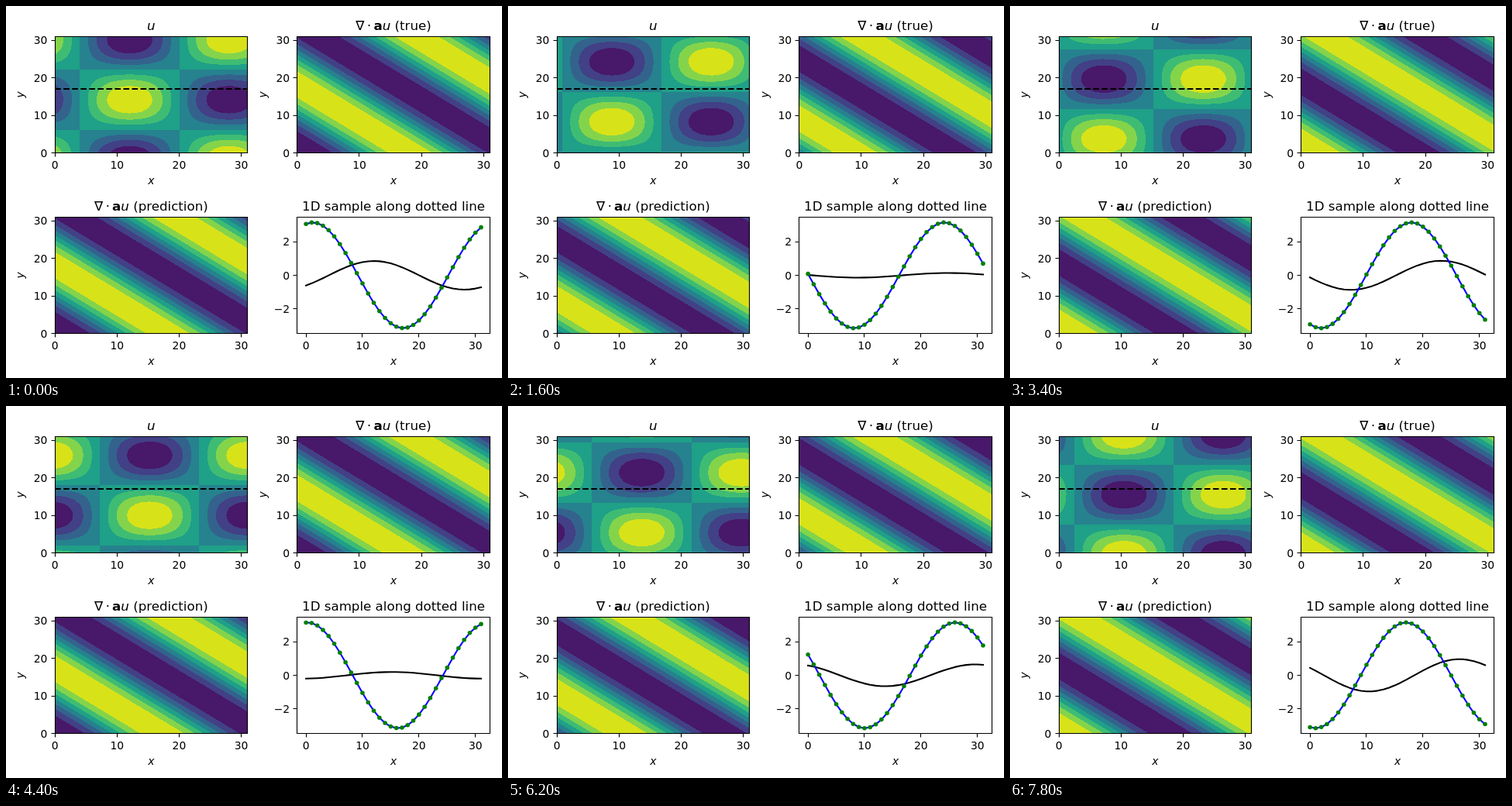
Animation, 640 px wide and 480 px high, one loop 8000 ms. Source, as an HTML page with a canvas:

```html
<!DOCTYPE html>
<html lang="en">
<head>
<meta charset="utf-8">
<title>Advection of a wave</title>
<style>
  html, body { margin: 0; width: 100%; height: 100%; overflow: hidden; background: #fff; }
  canvas, svg { position: absolute; left: 0; top: 0; width: 640px; height: 480px; }
  text { font: 13.89px "DejaVu Sans", sans-serif; fill: #000; }
  .title { font-size: 16.67px; text-anchor: middle; }
  .mid { text-anchor: middle; }
  .end { text-anchor: end; }
  .it { font-style: italic; }
  .b { font-weight: bold; }
</style>
</head>
<body>
<canvas id="plot" width="640" height="480"></canvas>
<svg id="labels" viewBox="0 0 640 480"></svg>
<script>
const STEP_MS = 200, STEPS = 40;
const N = 31, ROW = 17, K = Math.PI / 16;
const W = 248.5, H = 150;
const VIRIDIS = ['48186a', '424086', '33638d', '26828e', '1fa088', '3fbc73', '84d44b', 'd8e219']
  .map(h => [0, 2, 4].map(i => parseInt(h.slice(i, i + 2), 16)));

const ctx = document.getElementById('plot').getContext('2d');
const svg = document.getElementById('labels');

const divTitle = kind =>
  '∇<tspan dx=".2em">⋅</tspan><tspan dx=".2em" class="b">a</tspan>' +
  `<tspan class="it">u</tspan> (${kind})`;

const grid = { x: [0, N], y: [0, N], xt: [0, 10, 20, 30], yt: [0, 10, 20, 30], yLabel: true };
const line = {
  x: [-0.05 * N, 1.05 * N], y: [-1.1 * Math.PI, 1.1 * Math.PI],
  xt: [0, 10, 20, 30], yt: [-2, 0, 2], yLabel: false
};
const wave = { left: 63.1, top: 39.5, title: '<tspan class="it">u</tspan>', ...grid };
const exact = { left: 375.8, top: 39.5, title: divTitle('true'), ...grid };
const guess = { left: 63.1, top: 272.5, title: divTitle('prediction'), ...grid };
const sample = { left: 375.8, top: 272.5, title: '1D sample along dotted line', ...line };
const panels = [wave, exact, guess, sample];

const px = (p, x) => p.left + (x - p.x[0]) / (p.x[1] - p.x[0]) * W;
const py = (p, y) => p.top + H - (y - p.y[0]) / (p.y[1] - p.y[0]) * H;
const snap = v => Math.floor(v) + 0.5;

function addText(x, y, cls, html, turn = 0) {
  const spin = turn ? ` transform="rotate(${turn} ${x} ${y})"` : '';
  svg.insertAdjacentHTML('beforeend', `<text x="${x}" y="${y}" class="${cls}"${spin}>${html}</text>`);
}

function addLabels(p) {
  const mid = p.left + W / 2, base = p.top + H;
  addText(mid, p.top - 8.5, 'title', p.title);
  for (const t of p.xt) addText(px(p, t), base + 20.5, 'mid', t);
  for (const t of p.yt) addText(p.left - 9.7, py(p, t) + 5, 'end', String(t).replace('-', '−'));
  addText(mid, base + 40.2, 'mid it', 'x');
  if (p.yLabel) addText(p.left - 39.8, p.top + H / 2, 'mid it', 'y', -90);
}

function drawFrame(p) {
  const l = snap(p.left), r = snap(p.left + W), t = p.top, b = p.top + H;
  ctx.strokeStyle = '#000';
  ctx.lineWidth = 1.11;
  ctx.lineJoin = 'miter';
  ctx.beginPath();
  ctx.rect(l, t, r - l, b - t);
  for (const v of p.xt) {
    const x = snap(px(p, v));
    ctx.moveTo(x, b);
    ctx.lineTo(x, b + 5);
  }
  for (const v of p.yt) {
    const y = snap(py(p, v));
    ctx.moveTo(l, y);
    ctx.lineTo(l - 5, y);
  }
  ctx.stroke();
}

// Value of fn at p, interpolated linearly between whole grid points
function onGrid(fn, p, centre) {
  const i = Math.max(0, Math.min(N - 1, Math.floor(p)));
  const a = fn(K * (i - centre)), b = fn(K * (i + 1 - centre));
  return a + (b - a) * (p - i);
}

function fillBands(p, cx, cy, step, value) {
  const x0 = Math.floor(p.left), y0 = Math.floor(p.top);
  const w = Math.floor(p.left + W) - x0 + 1, h = H + 1;
  const img = ctx.createImageData(w, h);
  const at = (pos, c) => ({ cos: onGrid(Math.cos, pos, c), sin: onGrid(Math.sin, pos, c) });
  const cols = Array.from({ length: w }, (_, i) => at((x0 + i + 0.5 - p.left) / W * N, cx));
  for (let j = 0, o = 0; j < h; j++) {
    const row = at((p.top + H - y0 - j - 0.5) / H * N, cy);
    for (let i = 0; i < w; i++, o += 4) {
      const band = Math.floor(value(cols[i], row) / step) + 4;
      img.data.set(VIRIDIS[Math.max(0, Math.min(7, band))], o);
      img.data[o + 3] = 255;
    }
  }
  ctx.putImageData(img, x0, y0);
}

const product = (a, b) => a.cos * b.cos;
const divergence = (a, b) => -Math.PI * (a.sin * b.cos + a.cos * b.sin);

function drawCurve(points, color) {
  ctx.strokeStyle = color;
  ctx.lineWidth = 2.08;
  ctx.lineJoin = 'round';
  ctx.lineCap = 'square';
  ctx.beginPath();
  for (const [x, y] of points) ctx.lineTo(x, y);
  ctx.stroke();
  ctx.lineCap = 'butt';
}

function drawDashes() {
  const y = Math.round(py(wave, ROW));
  ctx.strokeStyle = '#000';
  ctx.lineWidth = 2.08;
  ctx.setLineDash([7.71, 3.33]);
  ctx.beginPath();
  ctx.moveTo(wave.left, y);
  ctx.lineTo(wave.left + W, y);
  ctx.stroke();
  ctx.setLineDash([]);
}

function drawSample(cx, cy) {
  const points = fn => Array.from({ length: N + 1 }, (_, x) => [px(sample, x), py(sample, fn(x))]);
  const slope = points(x => -Math.PI * Math.sin(K * (x - cx + ROW - cy)));
  drawCurve(points(x => Math.cos(K * (x - cx)) * Math.cos(K * (ROW - cy))), '#000');
  drawCurve(slope, '#00f');
  ctx.fillStyle = '#008000';
  for (const [x, y] of slope) {
    ctx.beginPath();
    ctx.arc(x, y, 2.78, 0, 2 * Math.PI);
    ctx.fill();
  }
}

function draw(n) {
  const cx = 12.03 + 1.601 * n, cy = 14.18 + 1.265 * n;
  ctx.fillStyle = '#fff';
  ctx.fillRect(0, 0, 640, 480);
  fillBands(wave, cx, cy, 0.25, product);
  fillBands(exact, cx, cy, 0.8, divergence);
  fillBands(guess, cx, cy, 0.8, divergence);
  drawDashes();
  drawSample(cx, cy);
  panels.forEach(drawFrame);
}

let shown = -1;
function tick() {
  const n = Math.floor(performance.now() / STEP_MS) % STEPS;
  if (n !== shown) draw(shown = n);
  requestAnimationFrame(tick);
}

panels.forEach(addLabels);
tick();
</script>
</body>
</html>
```
